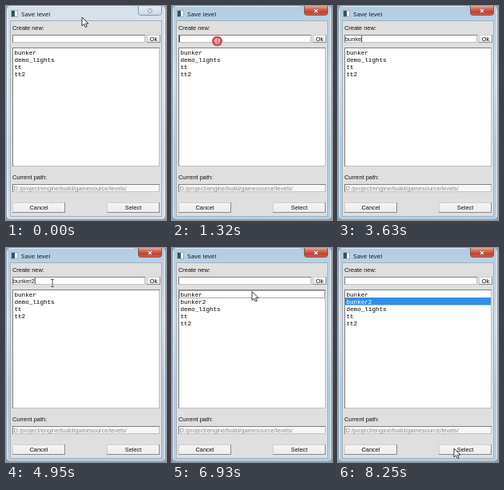
Animation of 200x268 px, one loop 8580 ms. Source, as an HTML page with a canvas:

```html
<!DOCTYPE html>
<html>
<head>
<meta charset="utf-8">
<title>Save level</title>
<style>
html, body { margin: 0; overflow: hidden; background: #8b98a5; }
canvas { display: block; }
</style>
</head>
<body>
<canvas id="stage" width="200" height="268"></canvas>
<script>
const ctx = document.getElementById('stage').getContext('2d');
const STEP = 330, STEPS = 26;
const SANS = '"Liberation Sans", Arial, sans-serif';
const MONO = '7.6px "Liberation Mono", "Courier New", monospace';

// [step, x, y] of the pointer's hot spot
const PATH = [[0, 95, 14], [1, 95, 14], [4, 57, 44], [15, 58, 44], [18, 183, 42],
  [19, 183, 43], [20, 165, 48], [22, 35, 61], [23, 35, 73], [25, 145, 251]];
const CLICKS = [[3.9, 56.5, 44], [18.25, 183, 41], [22.55, 34, 62]];

function box(x, y, w, h, fill, stroke) {
  ctx.fillStyle = fill;
  ctx.fillRect(x, y, w, h);
  if (stroke) {
    ctx.strokeStyle = stroke;
    ctx.lineWidth = 1;
    ctx.strokeRect(x + .5, y + .5, w - 1, h - 1);
  }
}

function text(s, x, y, font = `7.4px ${SANS}`, color = '#111', align = 'left') {
  ctx.font = font;
  ctx.fillStyle = color;
  ctx.textAlign = align;
  ctx.fillText(s, x, y);
}

function lines(color, width, ...segments) {
  ctx.strokeStyle = color;
  ctx.lineWidth = width;
  ctx.beginPath();
  for (const [x1, y1, x2, y2] of segments) {
    ctx.moveTo(x1, y1);
    ctx.lineTo(x2, y2);
  }
  ctx.stroke();
}

function gradient(y1, y2, ...colors) {
  const g = ctx.createLinearGradient(0, y1, 0, y2);
  colors.forEach((c, i) => g.addColorStop(i / (colors.length - 1), c));
  return g;
}

function button(label, x, y, w, h) {
  box(x, y, w, h, gradient(y, y + h, '#f6f6f6', '#ebebeb'), '#d0d0d0');
  lines('#8c8c8c', 1, [x, y + h - .5, x + w, y + h - .5], [x + w - .5, y, x + w - .5, y + h]);
  text(label, x + w / 2, y + h / 2 + 2.6, undefined, '#111', 'center');
}

function field(x, y, w, h, fill) {
  box(x, y, w, h, fill, '#c2c2c2');
  lines('#808080', 1, [x, y + .5, x + w, y + .5], [x + .5, y, x + .5, y + h]);
}

function drawFrame(active) {
  box(0, 0, 200, 268, '#8b98a5');
  ctx.fillStyle = active ? gradient(0, 268, '#b3cde1', '#cfe0ed', '#b0cae0', '#b5cfe4')
    : gradient(0, 268, '#d4dfea', '#dce6f0', '#cbd9e8', '#d3e0ee');
  ctx.beginPath();
  ctx.roundRect(1, 0, 198, 267, 4);
  ctx.fill();
  lines('rgba(255,255,255,.6)', 1, [1.5, 4, 1.5, 264], [198.5, 4, 198.5, 264], [4, .5, 160, .5]);
  box(5, 18, 190, 246, '#dfdfdf', '#a3b0bd');

  box(6, 5, 9, 9, '#f2f4f5', '#a5afb6');
  box(7, 6, 4, 7, gradient(6, 13, '#35506a', '#2f5a4c'));
  text('Save level', 19, 13, '8px "Open Sans", "Noto Sans", sans-serif');

  ctx.fillStyle = active ? gradient(0, 12, '#e3a99c', '#cf6450', '#c2402a', '#d4705a')
    : gradient(0, 12, '#e5ebf2', '#ccd8e5');
  ctx.strokeStyle = active ? '#8d5350' : '#8795a5';
  ctx.lineWidth = 1;
  ctx.beginPath();
  ctx.roundRect(165.5, -.5, 29, 12, [0, 0, 3, 3]);
  ctx.fill();
  ctx.stroke();
  const cross = [[178, 4, 182, 8], [182, 4, 178, 8]];
  lines(active ? '#7b4a4a' : '#56616e', 2.6, ...cross);
  lines('#fff', 1.3, ...cross);
}

function drawForm(step) {
  const saved = step >= 19;
  const typed = saved ? '' : 'bunker2'.slice(0, Math.max(0, step - 6));
  text('Create new:', 8, 30);
  field(8, 36, 166, 10, '#fff');
  text(typed, 9, 43.5);
  if (step >= 4 && step < 18 && (step * STEP) % 1060 < 800) {
    const x = 9.5 + ctx.measureText(typed).width;
    lines('#444', 1, [x, 37, x, 45]);
  }
  button('Ok', 176, 36, 17, 10);

  field(8, 52, 184, 149, '#fff');
  if (step >= 23) box(9, 62, 182, 9.5, '#338fe6');
  else if (saved) {
    ctx.setLineDash([1, 1]);
    ctx.strokeStyle = '#555';
    ctx.strokeRect(9.5, 53.5, 181, 9);
    ctx.setLineDash([]);
  }
  const names = ['bunker', 'demo_lights', 'tt', 'tt2'];
  if (saved) names.splice(1, 0, 'bunker2');
  names.forEach((name, i) =>
    text(name, 10.5, 61 + i * 9, MONO, step >= 23 && i === 1 ? '#fff' : '#000'));

  text('Current path:', 8, 217);
  field(8, 223, 184, 10, '#f7f7f7');
  text('D:/project/engine/build/gamesource/levels/', 9.5, 230.5, `7.5px ${SANS}`, '#858585');
  button('Cancel', 8, 246, 66, 13);
  button('Select', 126, 246, 66, 13);
}

function pointerAt(step) {
  const i = PATH.findIndex(p => p[0] >= step);
  const [t2, x2, y2] = PATH[i], [t1, x1, y1] = PATH[Math.max(0, i - 1)];
  const k = t2 > t1 ? (step - t1) / (t2 - t1) : 1;
  const e = k * k * (3 - 2 * k);
  return [x1 + (x2 - x1) * e, y1 + (y2 - y1) * e];
}

function drawClicks(step) {
  for (const [start, x, y] of CLICKS) {
    const age = step - start;
    if (age < 0 || age >= 1) continue;
    ctx.beginPath();
    ctx.arc(x, y, 4 + 12.5 * age, 0, 7);
    ctx.fillStyle = `rgba(235,60,65,${.55 * (1 - age) ** 2.5})`;
    ctx.fill();
    ctx.strokeStyle = `rgba(220,25,30,${.95 * (1 - age) ** 1.2})`;
    ctx.lineWidth = 2.4 - age;
    ctx.stroke();
  }
}

function drawPointer(step) {
  if (step >= 7 && step < 15) return;
  const [x, y] = pointerAt(step);
  ctx.save();
  ctx.translate(x, y);
  if (x > 8 && x < 174 && y > 36 && y < 46) {
    const beam = [[0, -4, 0, 4], [-2, -4.5, 2, -4.5], [-2, 4.5, 2, 4.5]];
    lines('rgba(255,255,255,.7)', 2, ...beam);
    lines('#444', .9, ...beam);
  } else {
    const arrow = new Path2D('M0 0V11L2.6 8.7L4.3 12.5L6.2 11.7L4.5 8H8Z');
    ctx.fillStyle = '#fff';
    ctx.fill(arrow);
    ctx.strokeStyle = '#222';
    ctx.lineWidth = .9;
    ctx.stroke(arrow);
  }
  ctx.restore();
}

function render() {
  const step = Math.floor(performance.now() / STEP) % STEPS;
  drawFrame(step >= 4);
  drawForm(step);
  drawClicks(step);
  drawPointer(step);
  requestAnimationFrame(render);
}
render();
</script>
</body>
</html>
```
